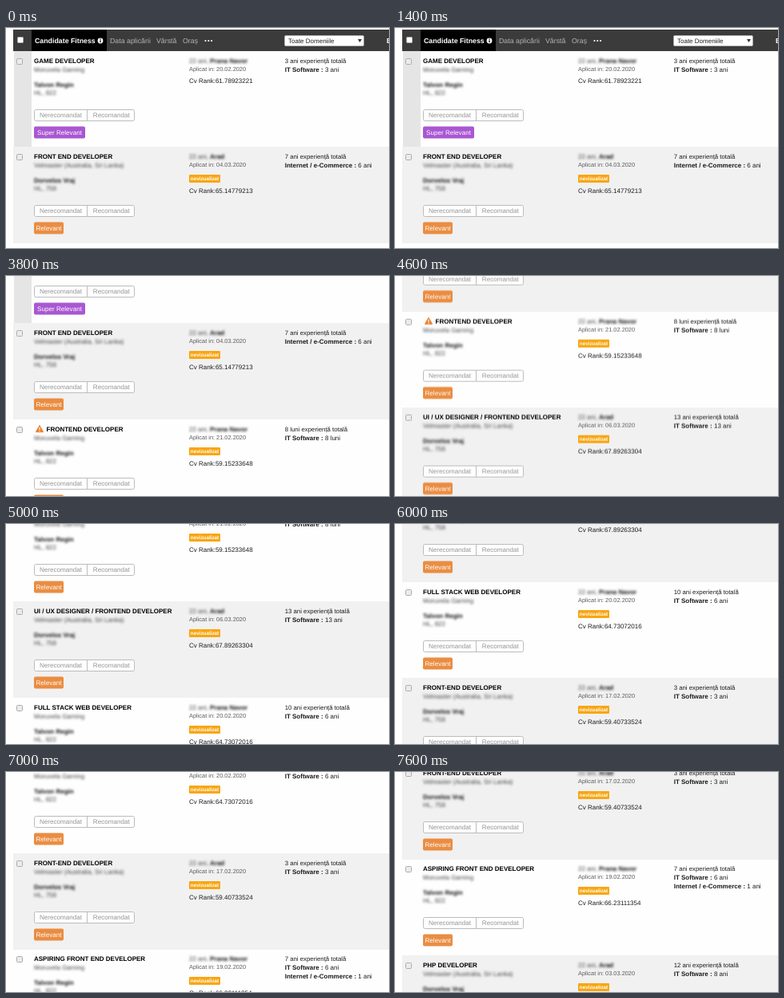
An HTML page that plays this animation: 479x276 px, repeating every 8000 ms.

```html
<!DOCTYPE html>
<html lang="ro">
<head>
<meta charset="utf-8">
<title>Candidate list</title>
<style>
html, body { margin: 0; width: 100%; height: 100%; overflow: hidden; background: #fefefe; }
svg { display: block; width: 479px; height: 276px; }
text { font: 8px "Liberation Sans", Arial, sans-serif; fill: #1c1c1c; white-space: pre; text-rendering: geometricPrecision; }
.b { font-weight: bold; }
.title { font-weight: bold; fill: #000; }
.tab { font-size: 8.8px; fill: #b4b4b4; }
.tab.on { font-weight: bold; fill: #fff; }
.date { font-size: 7.4px; fill: #5c5c5c; }
.years { font-size: 7.8px; }
.btn { font-size: 8.1px; fill: #959595; }
.tag { font-size: 8.1px; fill: #fff; }
.new { font-size: 6.3px; font-weight: bold; fill: #fff; }
.blur { filter: blur(1.5px); fill: #444; }
.blur.dark { fill: #111; font-weight: bold; }
#page { animation: scroll 8s -2ms infinite; }
@keyframes scroll {
  0% { transform: translateY(0); animation-timing-function: step-end; }
  42.5% { transform: translateY(0); animation-timing-function: steps(2); }
  47.5% { transform: translateY(-90px); animation-timing-function: steps(6); }
  62.5% { transform: translateY(-293px); animation-timing-function: steps(5); }
  75% { transform: translateY(-438px); animation-timing-function: steps(5); }
  87.5% { transform: translateY(-529px); animation-timing-function: steps(3); }
  95%, 100% { transform: translateY(-642px); animation-timing-function: step-end; }
}
</style>
</head>
<body>
<svg viewBox="0 0 479 276"><g id="page"></g></svg>
<script>
const IT = 'IT Software', WEB = 'Internet / e-Commerce';
const people = [
  { title: 'GAME DEVELOPER', date: '20.02.2020', rank: '61.78923221', total: '3 ani', areas: [[IT, '3 ani']], seen: true, best: true },
  { title: 'FRONT END DEVELOPER', date: '04.03.2020', rank: '65.14779213', total: '7 ani', areas: [[WEB, '6 ani']] },
  { title: 'FRONTEND DEVELOPER', date: '21.02.2020', rank: '59.15233648', total: '8 luni', areas: [[IT, '8 luni']], warn: true },
  { title: 'UI / UX DESIGNER / FRONTEND DEVELOPER', date: '06.03.2020', rank: '67.89263304', total: '13 ani', areas: [[IT, '13 ani']] },
  { title: 'FULL STACK WEB DEVELOPER', date: '20.02.2020', rank: '64.73072016', total: '10 ani', areas: [[IT, '6 ani']] },
  { title: 'FRONT-END DEVELOPER', date: '17.02.2020', rank: '59.40733524', total: '3 ani', areas: [[IT, '3 ani']] },
  { title: 'ASPIRING FRONT END DEVELOPER', date: '19.02.2020', rank: '66.23111354', total: '7 ani', areas: [[IT, '6 ani'], [WEB, '1 ani']] },
  { title: 'PHP DEVELOPER', date: '03.03.2020', total: '12 ani', areas: [[IT, '8 ani']] }
];
// Blurred private details, alternating between rows
const hidden = [
  { firm: 'Moruvela Gaming', name: 'Talvon Regin', place: 'HL, 822', who: 'Prana Navor' },
  { firm: 'Velmaster (Australia, Sri Lanka)', name: 'Dorvelos Vraj', place: 'HL, 758', who: 'Arad' }
];

const text = (x, y, s, cls = '', extra = '') => `<text x="${x}" y="${y}" class="${cls}" ${extra}>${s}</text>`;
const rect = (x, y, w, h, fill, extra = '') => `<rect x="${x}" y="${y}" width="${w}" height="${h}" fill="${fill}" ${extra}/>`;
const mid = 'text-anchor="middle"';
const check = (x, y, fill = '#ececec') => rect(x + .5, y + .5, 7, 7, fill, 'rx="1" stroke="#acacac"');

function header() {
  return rect(9, 2, 470, 27, '#3b3b3b') + rect(32, 2, 94, 27, '#000') + check(14, 11, '#fff')
    + text(36, 19, 'Candidate Fitness', 'tab on')
    + '<circle cx="118" cy="16" r="3.4" fill="#fff"/>' + rect(117.4, 15.4, 1.3, 2.8, '#000') + rect(117.4, 13.5, 1.3, 1.2, '#000')
    + text(130, 19, 'Data aplicării', 'tab') + text(188, 19, 'Vârstă', 'tab') + text(221, 19, 'Oraș', 'tab')
    + [249.5, 253.3, 257.1].map(x => `<circle cx="${x}" cy="16" r="1.1" fill="#fff"/>`).join('')
    + rect(348.5, 9.5, 99, 13, '#fff', 'rx="1.5" stroke="#aaa"')
    + text(353, 19, 'Toate Domeniile')
    + '<path d="M440 14h5l-2.5 4z" fill="#333"/>'
    + text(476, 19, 'E', 'tab on');
}

function row(p, i) {
  const h = hidden[i % 2];
  const tagW = p.best ? 64 : 37;
  let s = '';
  if (i % 2) s += rect(9, 0, 470, 121, '#f1f1f1');
  if (!i) s += rect(10, 0, 22, 120, '#e5e5e5');
  s += check(13, 9);
  if (p.warn) {
    s += '<path d="M42 7.5l4.6 8.2h-9.2z" fill="#ea7f2c" stroke="#ea7f2c" stroke-linejoin="round"/>'
      + rect(41.4, 9.8, 1.2, 3.2, '#fff') + rect(41.4, 13.8, 1.2, 1.2, '#fff');
  }
  s += text(p.warn ? 50.5 : 35, 15, p.title, 'title')
    + text(35, 26.3, h.firm, 'blur') + text(35, 44.8, h.name, 'blur dark') + text(35, 55, h.place, 'blur')
    + rect(35.5, 73.5, 125, 14, '#fefefe', 'rx="2" stroke="#bcbcbc"') + rect(101, 74, 1, 13, '#bcbcbc')
    + text(68.5, 83, 'Nerecomandat', 'btn', mid) + text(131.8, 83, 'Recomandat', 'btn', mid)
    + rect(35, 94.5, tagW, 15, p.best ? '#a957d2' : '#ea8d42', 'rx="2"')
    + text(35 + tagW / 2, 105, p.best ? 'Super Relevant' : 'Relevant', 'tag', mid)
    + text(229, 15, '22 ani,', 'blur') + text(255, 15, h.who, 'blur dark')
    + text(229, 25, 'Aplicat in: ' + p.date, 'date');
  if (!p.seen) s += rect(229, 35, 39, 10, '#f8a612', 'rx="1"') + text(248.5, 42.2, 'nevizualizat', 'new', mid);
  if (p.rank) s += text(229, p.seen ? 40 : 58, 'Cv Rank:' + p.rank);
  s += text(348.7, 15, p.total + ' experiență totală', 'years');
  p.areas.forEach(([area, time], k) => {
    s += text(348.7, 26.2 + 11 * k, `<tspan class="b">${area} :</tspan> ${time}`);
  });
  return `<g transform="translate(0 ${Math.round(29 + 120.4 * i)})">${s}</g>`;
}

document.getElementById('page').innerHTML = people.map(row).join('') + header();
</script>
</body>
</html>
```
